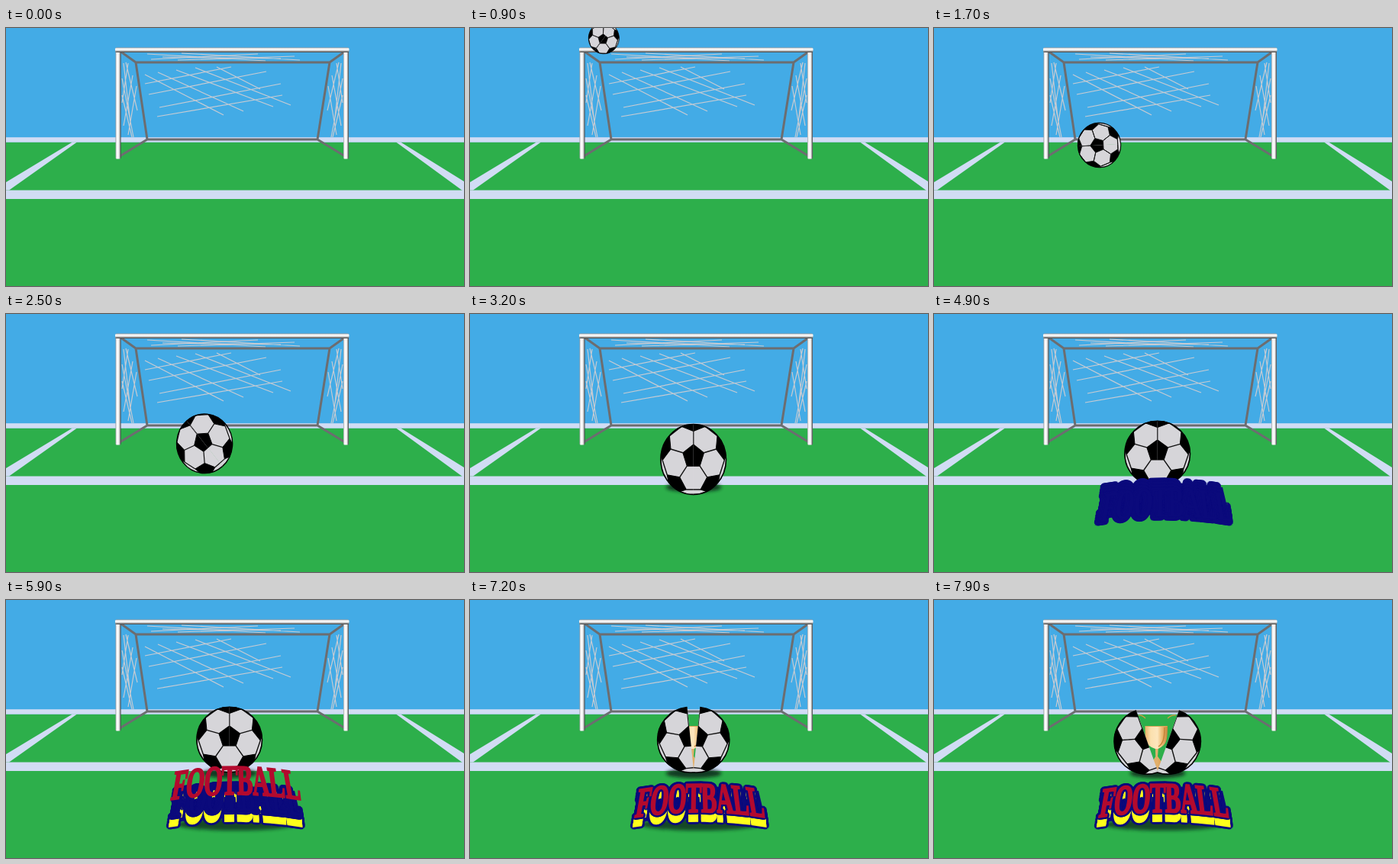
Animation of 600 by 338 pixels, one loop 8000 ms. Source, as an HTML page:

```html
<!DOCTYPE html>
<html lang="en">
<head>
<meta charset="utf-8">
<title>Football</title>
<style>
html, body { margin: 0; width: 100%; height: 100%; overflow: hidden; background: #2daf4b; }
svg { display: block; width: 100%; height: 100%; }
text { font: bold 55px "Liberation Serif", "Noto Serif", serif; }
</style>
</head>
<body>
<svg viewBox="0 0 600 338" preserveAspectRatio="none">
  <defs>
    <filter id="soft" x="-20%" y="-100%" width="140%" height="300%"><feGaussianBlur stdDeviation="2"/></filter>
    <linearGradient id="gold">
      <stop offset="0" stop-color="#e9b268"/><stop offset=".25" stop-color="#fbe0ae"/>
      <stop offset=".55" stop-color="#fde6bd"/><stop offset=".75" stop-color="#eebb74"/><stop offset="1" stop-color="#c8843a"/>
    </linearGradient>
    <linearGradient id="post">
      <stop offset="0" stop-color="#9a9da2"/><stop offset=".25" stop-color="#fff"/>
      <stop offset=".65" stop-color="#eee"/><stop offset="1" stop-color="#3c3d40"/>
    </linearGradient>
    <linearGradient id="bar" x2="0" y2="1">
      <stop offset="0" stop-color="#9a9da2"/><stop offset=".3" stop-color="#fff"/>
      <stop offset=".6" stop-color="#ddd"/><stop offset="1" stop-color="#333"/>
    </linearGradient>
    <clipPath id="disc"><circle r="43"/></clipPath>
    <clipPath id="clipL"><rect x="-50" y="-50" width="50.4" height="100"/></clipPath>
    <clipPath id="clipR"><rect x="0" y="-50" width="50" height="100"/></clipPath>
    <g id="ball"></g>
    <g id="word"></g>
  </defs>

  <rect width="600" height="150" fill="#43abe6"/>
  <rect y="149.5" width="600" height="188.5" fill="#2daf4b"/>
  <g fill="#d1dcf4">
    <rect y="143.2" width="600" height="6.5"/>
    <rect y="212.5" width="600" height="11.5"/>
    <path d="M87 149.5H93L4 212.5H0V202ZM511 149.5H517L600 201V213H598Z"/>
  </g>

  <g fill="none" stroke="#c6cbd3" stroke-width="1.2">
    <path d="M182 61L285 114M199 58L311 109M223 55L350 103M248 52L373 101M276 51L333 80
             M182 73L295 51M187 87L341 57M201 104L360 73M198 116L362 88"/>
    <path d="M185 34L340 43M230 33L385 42M190 41L330 34M225 42L378 37M205 38L360 40"/>
    <path id="side" d="M160 46L152 98M166 62L154 128M171 76L160 140M154 46L163 125M157 45L172 108M152 66L167 143M152 88L165 143"/>
    <use href="#side" transform="matrix(-1 0 0 1 593 0)"/>
  </g>
  <path d="M149 30L170 45H424L445 30M170 45L185 146H408L424 45M185 146L149 168M408 146L444 168"
        fill="none" stroke="#6c6d70" stroke-width="3"/>
  <rect x="143.5" y="28" width="7" height="143.5" rx="1.5" fill="url(#post)"/>
  <rect x="442" y="28" width="7" height="143.5" rx="1.5" fill="url(#post)"/>
  <rect x="143" y="25.5" width="306.5" height="6.5" rx="2" fill="url(#bar)"/>

  <ellipse id="shade" cx="293" cy="227" rx="36.500" ry="6.5" fill="#10251a" filter="url(#soft)"/>
  <g id="cup">
    <path d="M268 151Q272 150 277 155M317 151Q311 150 306 155" fill="none" stroke="#d99a45" stroke-width="1.2"/>
    <path d="M276.500 165H306C306 179 305 186 301 190Q298 193 293.500 195L293 205L298 212V223H286V212L290.500 205L290 195Q284 193 281 190C277 186 276.500 179 276.500 165Z" fill="url(#gold)"/>
    <path d="M302 167C302 182 300 188 294 192" fill="none" stroke="#c8843a" stroke-width="1.5"/>
    <path d="M290 195H293.500L293 205L298 212V223H286V212L290.500 205Z" fill="#d08a35" opacity=".6"/>
    <path d="M277 165.500H305.500" stroke="#e0a55a"/>
  </g>
  <g id="roll">
    <g id="left"><use href="#ball" clip-path="url(#clipL)"/></g>
    <g id="right"><use href="#ball" clip-path="url(#clipR)"/></g>
  </g>

  <ellipse id="wordShade" cx="301" cy="294" rx="78" ry="8" fill="#10251a" opacity=".75" filter="url(#soft)"/>
  <g id="navy" fill="#0b0a7c">
    <path d="M224 250Q301 238 378 250L388 292Q301 280 214 292Z"/>
    <g id="slab"></g>
  </g>
  <g id="yellow">
    <g id="sides" fill="#ffff1c" stroke="#ffff1c" stroke-width="2.5"></g>
    <g id="rim" fill="#0b0a7c"></g>
  </g>
  <g id="red"><use href="#word" fill="#b30a2e" stroke="#b30a2e" stroke-width="2.5"/></g>
</svg>
<script>
const $ = id => document.getElementById(id);
const move = (id, s) => $(id).setAttribute('transform', s);
const show = (id, on) => $(id).setAttribute('visibility', on ? 'visible' : 'hidden');
const clamp = v => Math.max(0, Math.min(1, v));

// Piecewise linear keys: [time, value]
function key(t, keys) {
  let a = keys[0];
  for (const b of keys) {
    if (t < b[0]) return b === a ? a[1] : a[1] + (b[1] - a[1]) * (t - a[0]) / (b[0] - a[0]);
    a = b;
  }
  return a[1];
}

// Ball: truncated icosahedron, flattened with a slight bulge
function buildBall() {
  const R = 43, tilt = 0.09, verts = [[0, 0, 1], [0, 0, -1]];
  for (let i = 0; i < 5; i++) {
    for (const s of [1, -1]) {
      const a = (-90 + i * 72 + (s < 0 ? 36 : 0)) * Math.PI / 180;
      verts.push([Math.cos(a) * 0.8944, Math.sin(a) * 0.8944, s * 0.4472]);
    }
  }
  const c = Math.cos(tilt), s = Math.sin(tilt);
  const pts = verts.map(([x, y, z]) => [x, y * c - z * s, y * s + z * c]);
  const dot = (a, b) => a[0] * b[0] + a[1] * b[1] + a[2] * b[2];
  const cross = (a, b) => [a[1] * b[2] - a[2] * b[1], a[2] * b[0] - a[0] * b[2], a[0] * b[1] - a[1] * b[0]];
  const corner = (v, n) => {
    const p = v.map((q, k) => 2 * q + n[k]), l = Math.hypot(...p);
    return p.map(q => q / l);
  };
  const flat = p => {
    const r = Math.hypot(p[0], p[1]);
    const k = R * (p[2] < 0 ? 1 / r : Math.min(1 / r, 0.95 + 0.2 * r * r));
    return (p[0] * k).toFixed(2) + ' ' + (p[1] * k).toFixed(2);
  };
  let patches = '', seams = '';
  for (const v of pts) {
    if (v[2] < -0.35) continue;
    const near = pts.filter(n => n !== v && dot(v, n) > 0.4);
    const up = Math.abs(v[1]) > 0.9 ? [1, 0, 0] : [0, 1, 0];
    const e = cross(v, up), f = cross(v, e);
    const ang = n => Math.atan2(dot(n, f), dot(n, e));
    near.sort((a, b) => ang(a) - ang(b));
    patches += 'M' + near.map(n => flat(corner(v, n))).join('L') + 'Z';
    for (const n of near) {
      const a = corner(v, n), b = corner(n, v);
      if (a[2] > 0 || b[2] > 0) seams += 'M' + flat(a) + 'L' + flat(b);
    }
  }
  $('ball').innerHTML = `<circle r="42.5" fill="#d6d5d9"/><g clip-path="url(#disc)">
    <path d="${patches}" stroke="#000" stroke-linejoin="round"/>
    <path d="${seams}" fill="none" stroke="#111" stroke-width="1.4"/></g>
    <circle r="42.5" fill="none" stroke="#000" stroke-width="1.6"/>`;
}

// Lettering: fanned on a shallow arch
function buildWord() {
  const wide = { F: 0.611, O: 0.778, T: 0.667, B: 0.667, A: 0.722, L: 0.667 };
  const pinch = 0.565;
  let x = 215, out = '';
  for (const ch of 'FOOTBALL') {
    const w = wide[ch] * 55 * pinch, mid = x + w / 2, u = (mid - 301) / 87;
    const m = [pinch, pinch * 0.17 * u, 0.2 * u, 1, mid, 277.5 + 7.5 * u * u];
    out += `<text text-anchor="middle" transform="matrix(${m.map(v => v.toFixed(3))})">${ch}</text>`;
    x += w;
  }
  $('word').innerHTML = out;
}

// Copies of the word: swept down by each drop, spread around a circle
function sweep(id, drops, radius) {
  const n = radius ? 16 : 1;
  let out = '';
  for (const d of drops) {
    const k = 1 + d * 0.002;
    for (let i = 0; i < n; i++) {
      const a = i * 2 * Math.PI / n;
      const x = 301 * (1 - k) + radius * Math.cos(a), y = d + radius * Math.sin(a);
      out += `<use href="#word" transform="matrix(${k} 0 0 1 ${x.toFixed(2)} ${y.toFixed(2)})"/>`;
    }
  }
  $(id).innerHTML = out;
}

const X = [[0.1, 134], [1.7, 216.5], [3.1, 292.7]];
const Y = [[0.1, -18], [0.5, -6], [1, 18], [1.4, 80], [1.7, 153.5], [2.2, 165], [2.7, 173], [3.1, 190.5], [3.6, 190.5], [3.8, 183]];
const RX = [[0.1, 12], [1.7, 28.5], [3.1, 43.3]];
const RY = [[0.1, 12], [1.7, 29.5], [3.1, 46.5], [3.6, 46.5], [3.8, 43.3]];
const SPIN = [[0.1, -192], [1.7, -93], [3.1, 0]];
const RISE = [[0, 110], [0.3, -23], [0.55, 0]];

function draw(t) {
  const rx = key(t, RX) / 43, ry = key(t, RY) / 43;
  move('roll', `translate(${key(t, X)} ${key(t, Y)}) scale(${rx} ${ry}) rotate(${key(t, SPIN)})`);
  const open = Math.max(0, (t - 6.9) * 19.5);
  move('left', `rotate(${-open} 0 41)`);
  move('right', `rotate(${open} 0 41)`);
  show('cup', open > 0);
  $('shade').setAttribute('opacity', 0.85 * clamp((t - 2.8) / 0.3));

  [['navy', 4.6], ['yellow', 5.1], ['red', 5.6]].forEach(([id, start]) => {
    show(id, t > start);
    move(id, `translate(0 ${key(t - start, RISE)})`);
  });
  show('wordShade', t >= 5.1);
}

buildBall();
buildWord();
sweep('slab', [0, 4, 8, 12], 4);
sweep('sides', [4, 6, 8, 10, 12], 0);
sweep('rim', [0], 3.5);

function tick() {
  draw(performance.now() % 8000 / 1000);
  requestAnimationFrame(tick);
}
tick();
</script>
</body>
</html>
```
